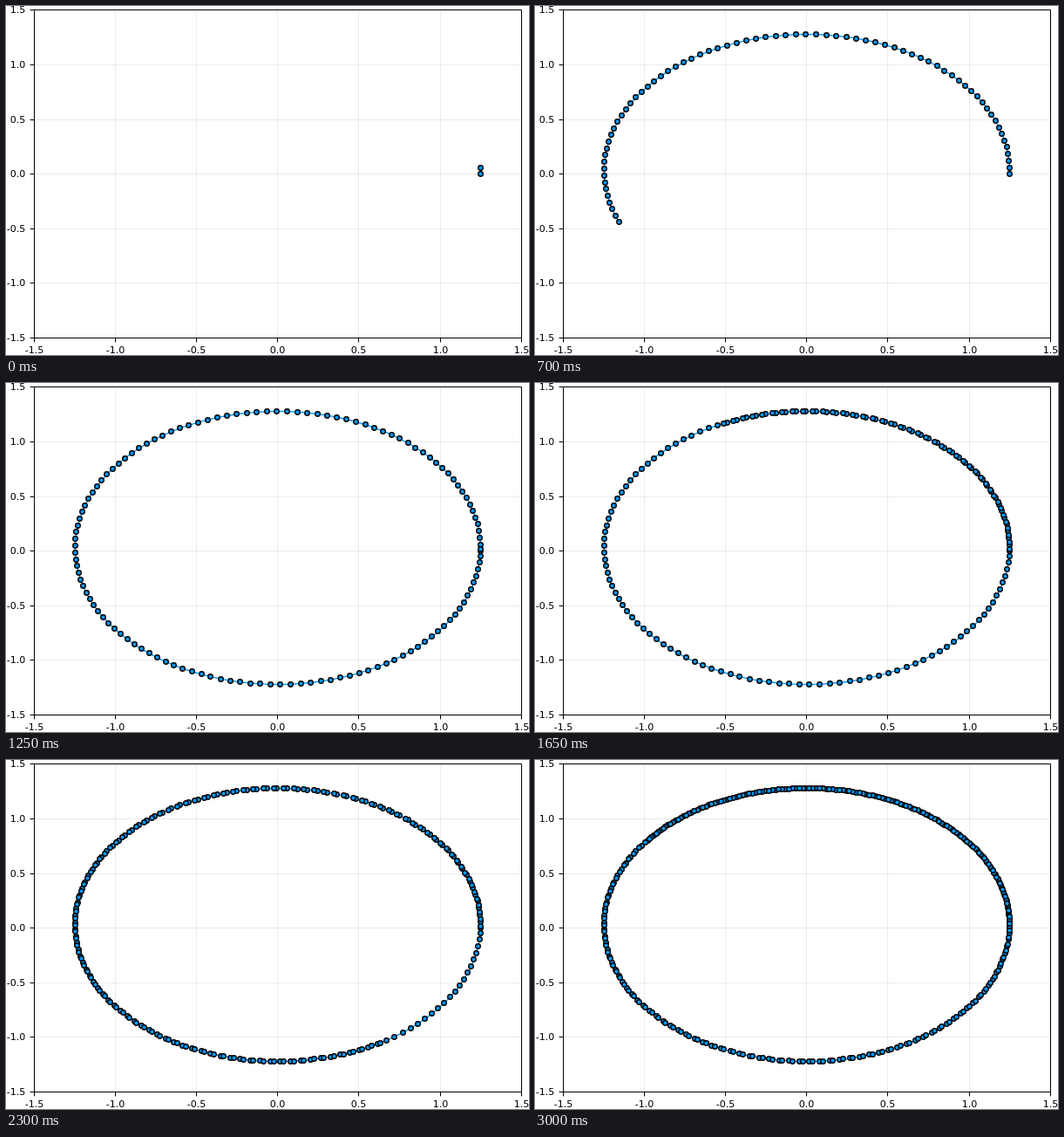
Write an HTML page with a canvas that moves like this. It is 600x400 px and loops after 3.05 s.

```html
<!DOCTYPE html>
<html lang="en">
<head>
<meta charset="utf-8">
<title>Circular orbit</title>
<style>
  html, body { margin: 0; width: 100%; height: 100%; overflow: hidden; background: #fff; }
  canvas { display: block; width: 600px; height: 400px; }
</style>
</head>
<body>
<canvas id="plot" width="600" height="400"></canvas>
<script>
const ctx = document.getElementById('plot').getContext('2d');
const BLUE = '#009afa';
const STEP_MS = 50, FRAMES = 61, PER_FRAME = 5;
const DT = 0.05;

// pixel centres of the ticks, k = -3..3 standing for -1.5..1.5
const tickX = k => Math.floor(311.6 + 93.2 * k) + 0.5;
const tickY = k => Math.floor(192.6 - 62.6 * k) + 0.5;
const px = x => 311.4 + 186.1 * x;
const py = y => 192.4 - 125.2 * y;
const ticks = [-3, -2, -1, 0, 1, 2, 3];

// the velocity turns by DT on every step
function orbit(steps) {
  const pts = [];
  let x = 1.25, y = 0;
  for (let n = 0; n <= steps; n++) {
    pts.push([px(x), py(y)]);
    x -= 1.25 * DT * Math.sin(n * DT);
    y += 1.25 * DT * Math.cos(n * DT);
  }
  return pts;
}
const points = orbit(1 + PER_FRAME * (FRAMES - 1));

function line(x1, y1, x2, y2) {
  ctx.beginPath();
  ctx.moveTo(x1, y1);
  ctx.lineTo(x2, y2);
  ctx.stroke();
}

function drawAxes() {
  const left = tickX(-3), right = tickX(3), top = tickY(3), bottom = tickY(-3);
  ctx.lineWidth = 1;
  ctx.strokeStyle = 'rgba(0,0,0,0.08)';
  for (const k of ticks.slice(1, -1)) {
    line(tickX(k), top, tickX(k), bottom);
    line(left, tickY(k), right, tickY(k));
  }
  ctx.strokeStyle = ctx.fillStyle = '#000';
  ctx.font = '11.1px "DejaVu Sans", sans-serif';
  for (const k of ticks) {
    const label = (k / 2).toFixed(1);
    line(tickX(k), bottom, tickX(k), bottom + 4.9);
    line(left - 4.9, tickY(k), left, tickY(k));
    ctx.textAlign = 'center';
    ctx.fillText(label, tickX(k), 398);
    ctx.textAlign = 'right';
    ctx.fillText(label, 22.3, tickY(k) + 3.5);
  }
}

function drawFrame() {
  ctx.lineWidth = 1;
  ctx.strokeStyle = '#000';
  ctx.strokeRect(tickX(-3), tickY(3), tickX(3) - tickX(-3), tickY(-3) - tickY(3));
}

function drawOrbit(count) {
  const shown = points.slice(0, count);
  ctx.strokeStyle = BLUE;
  ctx.lineWidth = 1.39;
  ctx.lineJoin = 'round';
  ctx.beginPath();
  for (const [x, y] of shown) ctx.lineTo(x + 0.5, y + 0.5);
  ctx.stroke();

  ctx.fillStyle = BLUE;
  ctx.strokeStyle = '#000';
  for (const [x, y] of shown) {
    ctx.beginPath();
    ctx.arc(Math.round(x) + 0.5, Math.round(y) + 0.5, 2.78, 0, 2 * Math.PI);
    ctx.fill();
    ctx.stroke();
  }
}

let last = -1;
function render(now) {
  const frame = Math.floor(now / STEP_MS) % FRAMES;
  if (frame !== last) {
    last = frame;
    ctx.fillStyle = '#fff';
    ctx.fillRect(0, 0, 600, 400);
    drawAxes();
    drawOrbit(2 + PER_FRAME * frame);
    drawFrame();
  }
}

let start = null;
function tick(now) {
  if (start === null) start = now;
  render(now - start);
  requestAnimationFrame(tick);
}
render(0);
requestAnimationFrame(tick);
</script>
</body>
</html>
```
